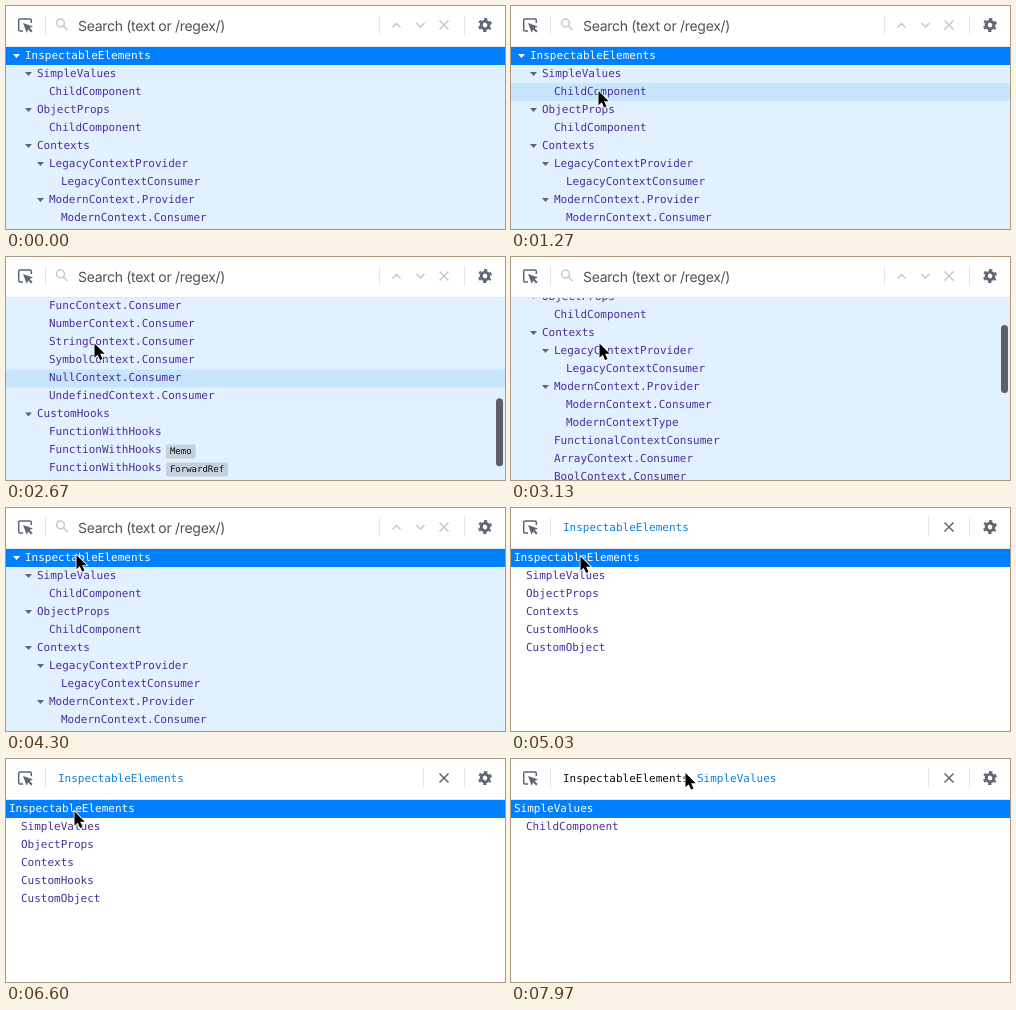
Recreate the animation shown at these times as an HTML page. Size 499 by 223 pixels, loop 8000 ms.

```html
<!DOCTYPE html>
<html lang="en">
<head>
<meta charset="utf-8">
<title>Component tree</title>
<style>
  html, body { margin: 0; width: 100%; height: 100%; overflow: hidden; background: #fff; }
  svg { display: block; }
  text { font: 11px "DejaVu Sans Mono", monospace; text-rendering: geometricPrecision; white-space: pre; }
  .name { fill: #4c2f9c; }
  .selected { fill: #fff; }
  .badge { font-size: 9px; fill: #111; }
  .search { font: 14px Inter, sans-serif; letter-spacing: -.3px; fill: #505156; }
  .crumb { fill: #111; }
  .current { fill: #0a84dd; }
  .line { fill: none; stroke: #5f6673; stroke-width: 1.5; }
  .dim { stroke: #c4c7cd; }
  .rule { stroke: #e6e6e6; }
</style>
</head>
<body>
<svg width="499" height="223" viewBox="0 0 499 223">
  <defs><clipPath id="pane"><rect y="41" width="499" height="182"/></clipPath></defs>
  <g clip-path="url(#pane)">
    <g id="tree"></g>
    <g id="owners"></g>
    <g id="child"></g>
    <rect id="thumb" x="490" width="7" height="68" rx="3.5" fill="#5c6066"/>
  </g>

  <path class="rule" d="M0 40.5H499M39.5 9V29M458.5 9V29"/>
  <path class="line" d="M17 25H14Q12.7 25 12.7 23.7V14.3Q12.7 13 14 13H24Q25.3 13 25.3 14.3V17"/>
  <path d="M17 17L27 20.6 23.6 22 26.6 25 25.2 26.4 22.2 23.4 20.7 26.8Z" fill="#5f6673"/>
  <g transform="translate(479 19) rotate(30)" fill="none" stroke="#5f6673">
    <circle r="3.8" stroke-width="3"/>
    <circle r="6" stroke-width="2" stroke-dasharray="3.1 3.183" stroke-dashoffset="1.55"/>
  </g>

  <g id="searchBar">
    <circle class="line dim" cx="54.5" cy="17" r="3.9"/>
    <path class="line dim" d="M57.3 19.8L61.5 24M386.5 21.5L390.5 17.5 394.5 21.5M410.5 17L414.5 21 418.5 17M433.5 14.5L442.5 23.5M442.5 14.5L433.5 23.5"/>
    <path class="rule" d="M373.5 9V29"/>
    <text class="search" x="72" y="25">Search (text or /regex/)</text>
  </g>
  <g id="ownerBar">
    <path class="line" d="M433.5 14.5L442.5 23.5M442.5 14.5L433.5 23.5"/>
    <path class="rule" d="M417.5 9V29"/>
    <text id="rootCrumb" class="crumb" x="52" y="23">InspectableElements</text>
    <text id="childCrumb" class="crumb current" x="186" y="23">SimpleValues</text>
  </g>

  <path id="cursor" d="M0 0V14.2L3.2 11.2 5.6 16.6 8 15.6 5.6 10.3H10.2Z" stroke="#fff" paint-order="stroke" stroke-width="1.6"/>
</svg>
<script>
const LOOP = 8000, ROW = 18, TOP = 41;
const OWNERS_AT = 4500, CHILD_AT = 7170;
const $ = id => document.getElementById(id);

// depth, name, optional badge; "+" marks an expanded parent
const treeRows = `0+InspectableElements
1+SimpleValues
2 ChildComponent
1+ObjectProps
2 ChildComponent
1+Contexts
2+LegacyContextProvider
3 LegacyContextConsumer
2+ModernContext.Provider
3 ModernContext.Consumer
3 ModernContextType
2 FunctionalContextConsumer
2 ArrayContext.Consumer
2 BoolContext.Consumer
2 FuncContext.Consumer
2 NumberContext.Consumer
2 StringContext.Consumer
2 SymbolContext.Consumer
2 NullContext.Consumer
2 UndefinedContext.Consumer
1+CustomHooks
2 FunctionWithHooks
2 FunctionWithHooks Memo
2 FunctionWithHooks ForwardRef
1+CustomObject
2 ChildComponent`.split("\n");
const ownerRows = ["0 InspectableElements", "1 SimpleValues", "1 ObjectProps", "1 Contexts", "1 CustomHooks", "1 CustomObject"];
const childRows = ["0 SimpleValues", "1 ChildComponent"];

function buildList(id, rows, indent, background, hoverColor) {
  let html = `<rect y="${TOP}" width="499" height="${Math.max(182, rows.length * ROW)}" fill="${background}"/>
    <rect class="hover" width="499" height="${ROW}" fill="${hoverColor}"/>
    <rect y="${TOP}" width="499" height="${ROW}" fill="#007fff"/>`;
  rows.forEach((row, i) => {
    const [name, badge] = row.slice(2).split(" ");
    const x = indent + 12 * row[0], y = TOP + i * ROW;
    if (row[1] === "+") html += `<path d="M${x - 12} ${y + 7}h7l-3.5 4z" fill="${i ? "#5f6673" : "#fff"}"/>`;
    html += `<text class="name ${i ? "" : "selected"}" x="${x}" y="${y + 12}">${name}</text>`;
    if (badge) {
      const bx = x + name.length * 6.62 + 4.4;
      html += `<rect x="${bx}" y="${y + 3}" width="${badge.length * 5.42 + 8}" height="14" rx="2" fill="#c3d1dd"/>
        <text class="badge" x="${bx + 4}" y="${y + 13}">${badge}</text>`;
    }
  });
  $(id).innerHTML = html;
  return { group: $(id), hover: $(id).querySelector(".hover"), count: rows.length };
}
const lists = [
  buildList("tree", treeRows, 19, "#e1f1ff", "#c8e5fe"),
  buildList("owners", ownerRows, 3, "#fff", "#e1f1ff"),
  buildList("child", childRows, 3, "#fff", "#e1f1ff"),
];

const cursorKeys = [
  [30, 137, -16], [800, 70, 172], [1000, 70, 172], [1270, 87, 84.5], [2000, 87.5, 84.5],
  [2500, 88, 86], [3600, 88, 86], [4300, 70, 46.5], [4500, 69, 48], [5270, 69, 48],
  [5630, 60, 130.5], [5850, 62, 148], [6070, 64, 131], [6600, 68, 52], [6900, 70, 68],
  [7780, 70, 68], [7970, 174, 13.5],
];
const scrollKeys = [
  [1300, 0], [2000, 206], [2300, 286], [2580, 286], [2670, 253], [3000, 95], [3300, 24], [3600, 0],
];
const smooth = p => p * p * (3 - 2 * p);

function sample(keys, t, ease = p => p) {
  const i = keys.findIndex(k => k[0] > t);
  if (i <= 0) return keys[i < 0 ? keys.length - 1 : 0].slice(1);
  const [a, b] = [keys[i - 1], keys[i]];
  const p = ease((t - a[0]) / (b[0] - a[0]));
  return a.slice(1).map((v, j) => v + (b[j + 1] - v) * p);
}

// The hovered row stays as it was while the list scrolls.
function hoveredRow(t) {
  if (t > 1300 && t < 2300) t = 1300;
  if (t > 2580 && t < 3600) t = 2580;
  const y = sample(cursorKeys, t, smooth)[1];
  if (t < 1000 || y < TOP) return -1;
  return Math.floor((y - TOP + sample(scrollKeys, t)[0]) / ROW);
}

const show = (el, on) => el.setAttribute("visibility", on ? "visible" : "hidden");

function draw(t) {
  const view = t < OWNERS_AT ? 0 : t < CHILD_AT ? 1 : 2;
  const [scroll] = sample(scrollKeys, t);
  const row = hoveredRow(t);
  lists.forEach(({ group, hover, count }, i) => {
    show(group, i === view);
    show(hover, i === view && row >= 0 && row < count);
    hover.setAttribute("y", TOP + row * ROW);
  });
  lists[0].group.setAttribute("transform", `translate(0 ${-scroll})`);

  $("thumb").setAttribute("y", 43 + scroll * 182 / 468);
  $("thumb").setAttribute("opacity", t < 1300 ? 0 : Math.max(0, Math.min(1, (4100 - t) / 250)));

  show($("searchBar"), view === 0);
  show($("ownerBar"), view > 0);
  show($("childCrumb"), view === 2);
  $("rootCrumb").classList.toggle("current", view === 1);

  const [x, y] = sample(cursorKeys, t, smooth);
  show($("cursor"), t >= 30);
  $("cursor").setAttribute("transform", `translate(${x + .5} ${y + .5})`);
}

const start = performance.now();
function tick() {
  draw((performance.now() - start) % LOOP);
  requestAnimationFrame(tick);
}
draw(0);
requestAnimationFrame(tick);
</script>
</body>
</html>
```
